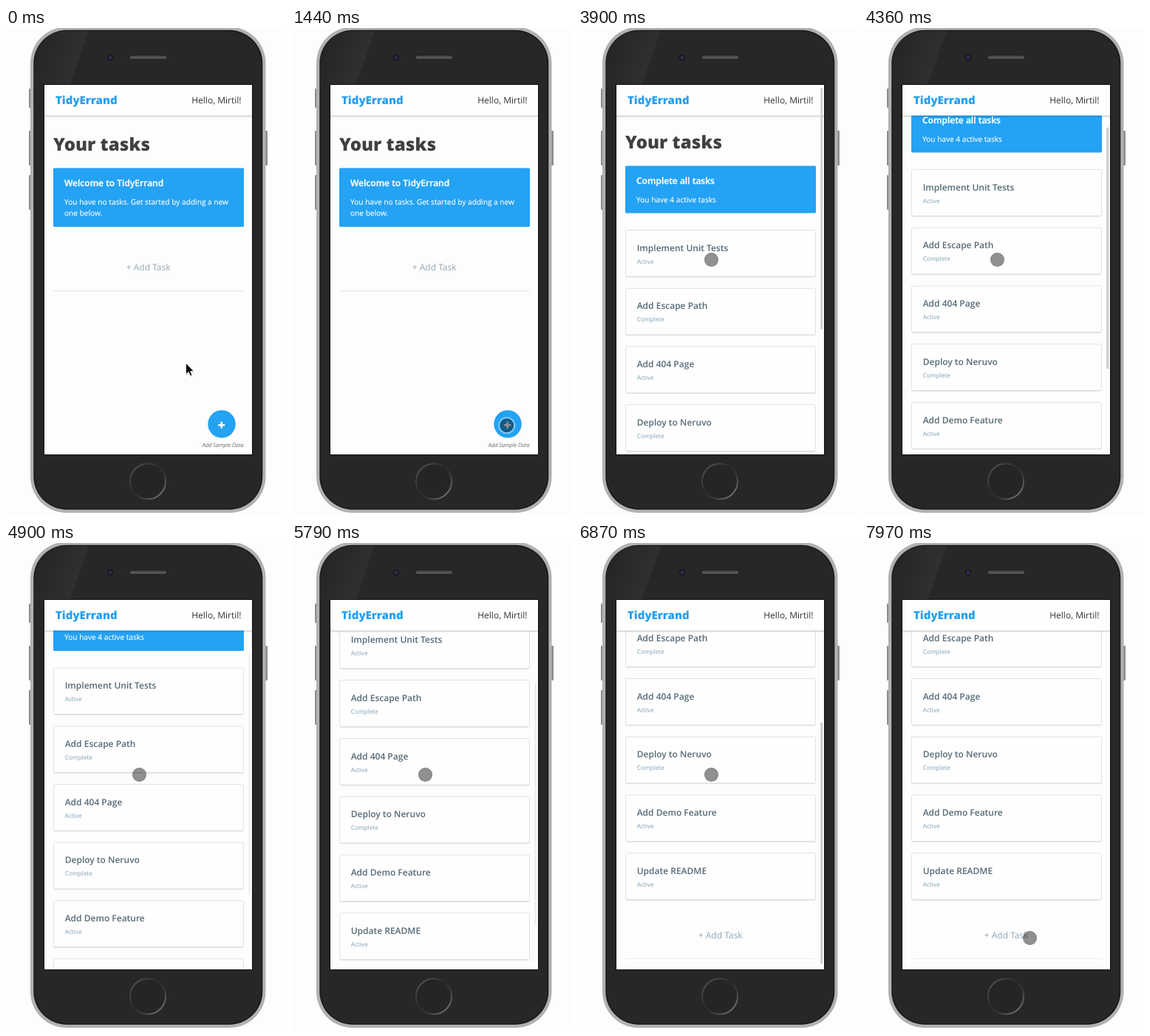
These frames come from a looping animation (379x659 px, 8000 ms). An HTML page:

```html
<!DOCTYPE html>
<html lang="en">
<head>
<meta charset="utf-8">
<title>Task list demo</title>
<style>
  html, body { margin: 0; width: 100%; height: 100%; overflow: hidden; background: #fdfdfd; }
  svg { display: block; }
  text { font-family: "Open Sans", "Noto Sans", sans-serif; font-size: 12px; text-rendering: geometricPrecision; }
  .logo { font-size: 15px; font-weight: 800; fill: #24a0f2; }
  .h1 { font-size: 24px; font-weight: 800; fill: #3e4042; }
  .bold { font-weight: 600; fill: #fff; stroke: #fff; stroke-width: .3; }
  .body { font-size: 10.13px; fill: #fff; stroke: #fff; stroke-width: .15; }
  .task { font-weight: 600; fill: #566a76; }
  .status { font-size: 8.25px; fill: #7fa0b3; }
  .add { fill: #92a8b7; text-anchor: middle; }
  .hint { font-size: 7.6px; font-weight: 300; font-style: italic; fill: #222; text-anchor: end; }
  .plus { font-size: 19px; font-weight: 800; font-style: italic; fill: #fff; text-anchor: middle; }
</style>
</head>
<body>
<svg width="379" height="659" viewBox="0 0 379 659">
  <defs>
    <clipPath id="screen"><rect x="52" y="77" width="281" height="500"/></clipPath>
    <clipPath id="face"><rect x="38.5" y="4" width="308" height="646" rx="43"/></clipPath>
    <linearGradient id="gloss" gradientUnits="userSpaceOnUse" x1="45" y1="30" x2="108" y2="52">
      <stop offset="0" stop-color="#262626"/><stop offset="1" stop-color="#313232"/>
    </linearGradient>
    <linearGradient id="ring" x1="0" y1="0" x2="1" y2="1">
      <stop offset="0" stop-color="#5a5a5a"/><stop offset=".45" stop-color="#2a2a2a"/>
      <stop offset=".65" stop-color="#3a3a3a"/><stop offset="1" stop-color="#8a8a8a"/>
    </linearGradient>
    <linearGradient id="drop" x1="0" y1="0" x2="0" y2="1">
      <stop offset="0" stop-color="#000" stop-opacity=".2"/><stop offset="1" stop-color="#000" stop-opacity="0"/>
    </linearGradient>
    <pattern id="mesh" width="2" height="2" patternUnits="userSpaceOnUse">
      <rect width="2" height="2" fill="#585858"/><rect width="1" height="1" fill="#3c3c3c"/>
    </pattern>
  </defs>

  <g id="phone">
    <g fill="#8c8c8c">
      <rect x="31" y="82" width="4" height="26" rx="1"/>
      <rect x="31" y="139" width="4" height="47" rx="1"/>
      <rect x="31" y="199" width="4" height="47" rx="1"/>
      <rect x="350" y="139" width="4" height="47" rx="1"/>
    </g>
    <rect x="33" y="-1.5" width="318.5" height="657.5" rx="49" fill="#b0b1b1"/>
    <rect x="37.3" y="2.8" width="310" height="649" rx="45" fill="#181818"/>
    <rect x="38.8" y="4.3" width="307" height="646" rx="43.5" fill="#272727"/>
    <path clip-path="url(#face)" d="M38 0H113L86 78H38Z" fill="url(#gloss)"/>
    <rect x="167" y="37" width="51" height="5.5" rx="2.75" fill="url(#mesh)" stroke="#1b1b1b"/>
    <circle cx="141" cy="40" r="4.5" fill="#1a1a1e"/>
    <circle cx="141" cy="40" r="2.4" fill="#2c2c52"/>
    <circle cx="192" cy="613.5" r="24" fill="#252525" stroke="url(#ring)" stroke-width="2"/>
    <rect x="51" y="76" width="283" height="502" fill="#111"/>
    <rect x="52" y="77" width="281" height="500" fill="#fdfdfd"/>
  </g>

  <g clip-path="url(#screen)">
    <g id="page">
      <text class="h1" x="64" y="165.5">Your tasks</text>
      <g id="empty">
        <rect x="64" y="189.5" width="258" height="79.5" rx="1.5" fill="#24a2f3"/>
        <text class="bold" x="79" y="214.3">Welcome to TidyErrand</text>
        <text class="body" x="79" y="238.5">You have no tasks. Get started by adding a new</text>
        <text class="body" x="79" y="254.2">one below.</text>
        <text class="add" x="192.7" y="327.5">+ Add Task</text>
        <rect x="64" y="355" width="258" height="1.5" fill="#ececec"/>
        <circle cx="292" cy="535.9" r="18.75" fill="#24a2f3"/>
        <text class="plus" x="291.7" y="543.6">+</text>
        <text class="hint" x="321.7" y="567">Add Sample Data</text>
      </g>
      <g id="list">
        <rect x="64" y="189.5" width="258" height="64" rx="1.5" fill="#24a2f3"/>
        <text class="bold" x="79" y="214.3">Complete all tasks</text>
        <text class="body" x="79" y="238.5">You have 4 active tasks</text>
        <g id="cards"></g>
        <text class="add" x="192.7" y="785">+ Add Task</text>
        <rect x="64" y="812.5" width="258" height="1" fill="#ececec"/>
      </g>
    </g>
    <rect x="52" y="77" width="281" height="41.5" fill="#fefefe"/>
    <rect x="52" y="118.5" width="281" height="3" fill="url(#drop)"/>
    <text class="logo" x="67" y="103.3">TidyErrand</text>
    <text x="318.5" y="102.3" text-anchor="end" fill="#333">Hello, Mirtil!</text>
    <rect id="thumb" x="328.3" width="2.8" height="327" rx="1.4" fill="#c9c9c9"/>
  </g>

  <g id="touch">
    <circle id="halo" fill="none" stroke="#fff" stroke-opacity=".45" stroke-width="2"/>
    <circle r="9.5" fill="#000" fill-opacity=".43"/>
    <circle r="9" fill="none" stroke="#000" stroke-opacity=".1"/>
  </g>
  <g id="arrow">
    <path d="M.5 2V17.5L4 14L6.5 19L9 18L7 13H11.5Z" fill="#000" fill-opacity=".15"/>
    <path d="M0 0V15.4L3.6 12.1L5.9 17.4L8.4 16.4L6.1 11.2H10.7Z" stroke="#fff" stroke-width=".9"/>
  </g>
</svg>
<script>
  const $ = id => document.getElementById(id);
  const LOOP = 8000, PRESS = 1440, LOADED = 1850;

  const tasks = [
    ["Implement Unit Tests", "Active"], ["Add Escape Path", "Complete"],
    ["Add 404 Page", "Active"], ["Deploy to Neruvo", "Complete"],
    ["Add Demo Feature", "Active"], ["Update README", "Active"]
  ];
  $("cards").innerHTML = tasks.map(([name, status], i) => `
    <g transform="translate(64 ${276 + i * 78.75})">
      <rect x=".5" y="1.5" width="257" height="63" rx="2" fill="#dcdfe0"/>
      <rect x=".5" y=".5" width="257" height="62.7" rx="2" fill="#fefefe" stroke="#e0e2e3"/>
      <text class="task" x="15.7" y="28.6">${name}</text>
      <text class="status" x="15.7" y="45.5">${status}</text>
    </g>`).join("");

  // [time, scroll offset, scrollbar opacity]
  const scroll = [
    [0, 0, 0], [3900, 3, .9], [4010, 6, 1],
    [4310, 40, 1], [4360, 85, 1], [4420, 106.5, 1],
    [4900, 107.5, .25], [5020, 120, 1], [5140, 142, 1], [5260, 160, 1], [5380, 168.5, 1],
    [5790, 169.5, .3], [5890, 192, 1], [5990, 222, 1], [6090, 230, 1], [6270, 231, 1],
    [6750, 232, 1], [6810, 243, 1], [6870, 250.5, 1]
  ];

  // Pointer moves, advanced in even ticks
  const approach = { from: [243.5, 453.3], to: [289, 535], start: 50, end: 590, ticks: 10 };
  const toList = { from: [290.7, 537.7], to: [180.5, 313.5], start: 2510, end: 3540, ticks: 19 };
  const toAdd = { from: toList.to, to: [224.5, 534.5], start: 7350, end: 7970, ticks: 11 };

  function place(el, { from, to, start, end, ticks }, t) {
    const gap = (end - start) / (ticks - 1);
    const tick = Math.min(ticks, Math.max(0, Math.floor((t - start) / gap + 1e-6) + 1));
    const p = (1 - Math.cos(Math.PI * tick / ticks)) / 2;
    const [x, y] = from.map((a, i) => a + (to[i] - a) * p);
    el.setAttribute("transform", `translate(${x} ${y})`);
  }
  const show = (id, on) => $(id).setAttribute("visibility", on ? "visible" : "hidden");

  function draw(t) {
    show("empty", t < LOADED);
    show("list", t >= LOADED);

    let [, y, bar] = scroll.filter(s => s[0] <= t).pop();
    if (t >= 7350) bar = Math.max(0, 1 - (t - 7290) / 240);
    $("page").setAttribute("transform", `translate(0 ${-y})`);
    $("thumb").setAttribute("y", 79 + y * .654);
    $("thumb").setAttribute("opacity", bar);

    show("arrow", t < 760);
    show("touch", t >= 760);
    show("halo", t >= 760 && t < LOADED);
    place($("arrow"), approach, t);
    place($("touch"), t < toAdd.start ? toList : toAdd, t);
    const pulse = Math.min(1, Math.max(0, (t - PRESS) / 230));
    $("halo").setAttribute("r", 10.4 + Math.sin(pulse * Math.PI) * 1.2);
  }

  function frame(now) {
    draw(now % LOOP);
    requestAnimationFrame(frame);
  }
  draw(0);
  requestAnimationFrame(frame);
</script>
</body>
</html>
```
